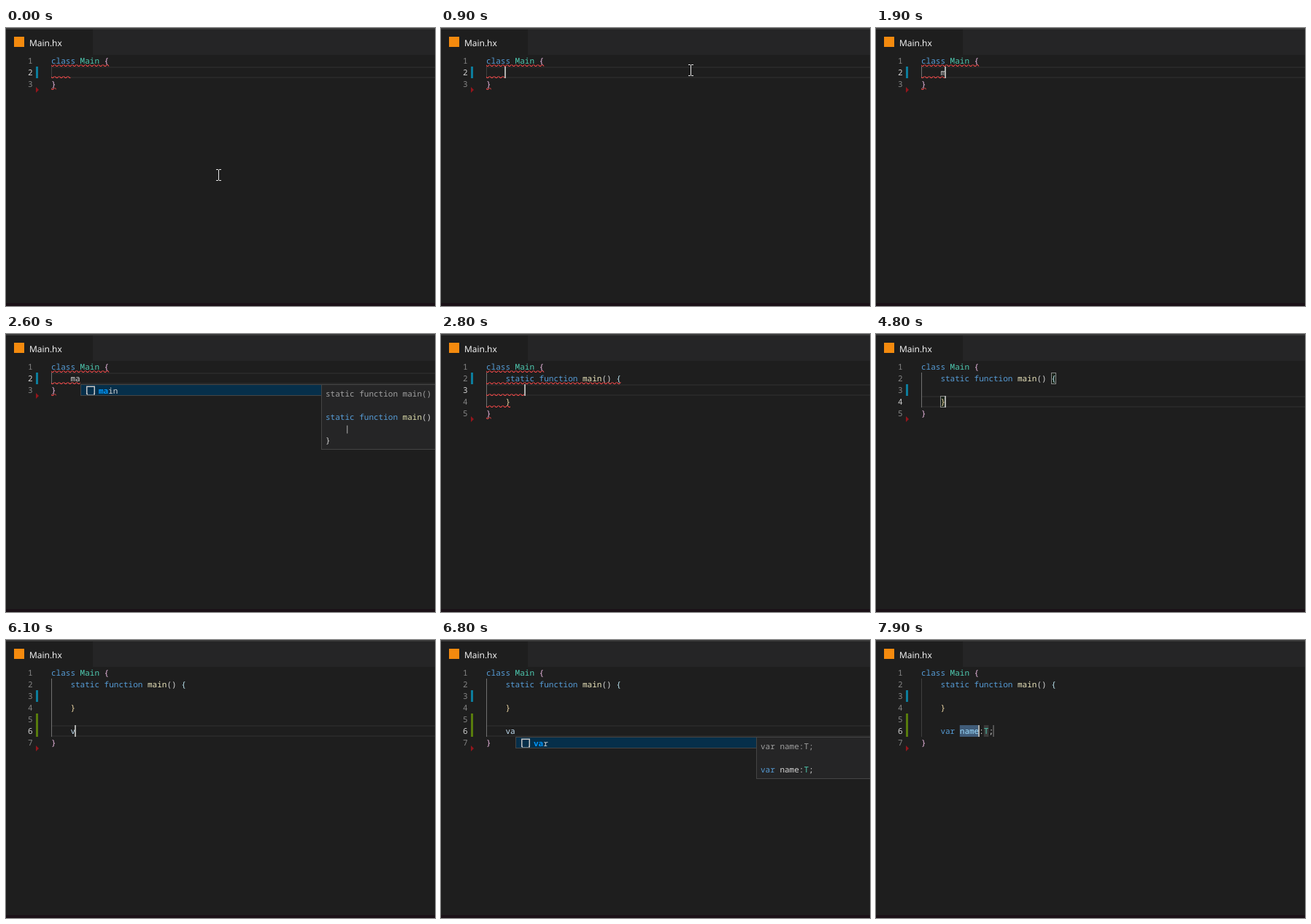
Write an HTML page that moves like this. It is 588 px wide and 382 px high and loops after 8 s.

```html
<!DOCTYPE html>
<html lang="en">
<head>
<meta charset="utf-8">
<title>Main.hx</title>
<style>
html, body { margin: 0; width: 100%; height: 100%; overflow: hidden; background: #1e1e1e; }
svg { display: block; width: 588px; height: 382px; }
text { font: 11px "Noto Sans Mono", monospace; text-rendering: geometricPrecision; white-space: pre; }
.tab { font: 12px "Open Sans", sans-serif; }
.num { text-anchor: end; }
.hit { font-weight: 700; }
</style>
</head>
<body>
<svg viewBox="0 0 588 382">
  <defs>
    <pattern id="wave" x="62" y="2" width="6" height="16" patternUnits="userSpaceOnUse">
      <path fill="#f44747" d="M5.5 0L2.5 3H1.1L4.1 0ZM4 0L6 2V.6L5.4 0ZM0 2L1 3H2.4L0 .6Z"/>
    </pattern>
  </defs>
  <rect width="588" height="382" fill="#1e1e1e"/>
  <rect width="588" height="37" fill="#252526"/>
  <rect width="119" height="37" fill="#1e1e1e"/>
  <rect width="588" height="2" fill="#3a3a3a"/>
  <rect y="378" width="588" height="4" fill="#1b1117"/>
  <rect x="11" y="12" width="14" height="14" fill="#f48a0e"/>
  <text class="tab" x="32" y="25" fill="#fff">Main.hx</text>
  <g id="view"></g>
</svg>
<script>
const LOOP = 8000, LEFT = 62, TOP = 37, ROW = 16, CHAR = 6.6;
const view = document.getElementById('view');

const colors = {
  class: '#569cd6', static: '#569cd6', function: '#569cd6', var: '#569cd6',
  Main: '#4ec9b0', T: '#4ec9b0', main: '#ece6bd', name: '#9cdcfe',
  v: '#c0dcf0', va: '#c0dcf0', '|': '#d4d4d4'
};

// I-beam pointer: time, x, y
const pointer = [
  [0, 291, 202], [100, 287, 194], [200, 286, 168], [300, 292, 128],
  [400, 305, 90], [500, 320, 67], [600, 330, 60], [900, 342, 58], [1000, 341, 61]
];

const rowY = row => TOP + (row - 1) * ROW;
const colX = col => LEFT + col * CHAR;
const rect = (x, y, w, h, fill, extra = '') =>
  `<rect x="${x}" y="${y}" width="${w}" height="${h}" fill="${fill}" ${extra}/>`;
const text = (x, y, str, fill, cls = '') =>
  `<text x="${x.toFixed(2)}" y="${y}" fill="${fill}" class="${cls}">${str}</text>`;

// Colours each word; pick(word) may override the palette
function code(str, x, y, pick = () => '') {
  let out = '';
  for (const m of str.matchAll(/\w+|[^\w\s]+/g))
    out += text(x + m.index * CHAR, y, m[0], pick(m[0]) || colors[m[0]] || '#d4d4d4');
  return out;
}

function bodyLines(t) {
  const fn = ['    static function main() {', ' '.repeat(8), '    }'];
  const pad = ' '.repeat(4);
  if (t < 1900) return [pad];
  if (t < 2100) return [pad + 'm'];
  if (t < 2800) return [pad + 'ma'];
  if (t < 5000) return fn;
  if (t < 5100) return [...fn, pad];
  const typed = t < 6100 ? '' : t < 6400 ? 'v' : t < 7000 ? 'va' : 'var name:T;';
  return [...fn, '', pad + typed];
}

// Caret: row, column and the time it last moved or gained focus
function caretAt(t) {
  const moves = [
    [0, 2, 4], [900, 2, 4], [1900, 2, 5], [2100, 2, 6], [2800, 3, 8], [4700, 4, 5],
    [5000, 5, 4], [5100, 6, 4], [6100, 6, 5], [6400, 6, 6], [7000, 6, 12]
  ];
  const [since, row, col] = moves.filter(m => m[0] <= t).pop();
  let age = t - since;
  if (since === 6400) age += 100;
  if (since === 7000) age += 100;
  return { row, col, on: since > 0 && age % 1000 < 500 };
}

function popup(x, y, word, hits, docs, h) {
  const px = Math.round(x), dx = px + 330;
  let out = rect(px + .5, y + .5, 330, 15, '#062f4a', 'stroke="#454545"');
  out += `<path d="M${px + 10} ${y + 13.5}H${px + 8.75}V${y + 3.25}H${px + 19.25}V${y + 13.5}H${px + 18}" fill="none" stroke="#c5c5c5" stroke-width="1.5"/>`;
  out += `<path d="M${px + 10} ${y + 14.5}H${px + 19}" stroke="#c5c5c5" stroke-dasharray="1 1"/>`;
  out += text(px + 25, y + 13, word.slice(0, hits), '#0097fb', 'hit');
  out += text(px + 25 + hits * CHAR, y + 13, word.slice(hits), '#d4d4d4');
  out += rect(dx + .5, y + .5, 300, h - 1, '#252526', 'stroke="#454545"');
  out += code(docs[0], dx + 6, y + 17, () => '#a0a0a0');
  docs.forEach((s, i) => {
    out += code(s, dx + 6, y + 49 + i * ROW, w => w === 'main' ? '#dcdcaa' : w === 'name' ? '#d4d4d4' : '');
  });
  return out;
}

function draw(t) {
  const lines = ['class Main {', ...bodyLines(t), '}'];
  const last = lines.length, caret = caretAt(t), picked = t >= 7000;
  const cy = rowY(caret.row);
  let out = '';

  if (!picked)
    out += rect(LEFT, cy, 526, 2, '#282828') + rect(LEFT, cy + 14, 526, 2, '#282828');
  else
    out += rect(colX(8), cy, 4 * CHAR, ROW, '#405c79') + rect(colX(13), cy, CHAR, ROW, '#3a3a3a')
      + rect(160, cy, 2, ROW, '#525252');

  out += rect(LEFT, rowY(2), 1, (last - 2) * ROW, t < 1900 || picked ? '#404040' : '#707070');

  if (t >= 4800 && t < 5000)
    for (const [row, col] of [[2, 27], [4, 4]])
      out += rect(Math.round(colX(col)) + .5, rowY(row) + .5, 6, 15, '#1b251b', 'stroke="#888"');

  lines.forEach((line, i) => {
    const row = i + 1, base = rowY(row) + 12;
    const outer = i === 0 || row === last;
    out += text(36.5, base, row, row === caret.row ? '#d0d0d0' : '#858585', 'num');
    out += code(line, LEFT, base, w =>
      w === '{' ? (outer ? '#eab8e0' : '#b9e2ee') : w === '}' ? (outer ? '#eab8e0' : '#efd9a5') : '');
    if (t < 3900) out += rect(LEFT, rowY(row) + 13, (line.length * CHAR).toFixed(1), 3, 'url(#wave)');
  });

  // change marks in the gutter
  out += rect(41, rowY(t < 3000 ? 2 : 3), 3, ROW, '#0c7d9d');
  if (t >= 5400) out += rect(41, rowY(5), 3, 2 * ROW, '#587c0c');
  const end = rowY(last + 1);
  out += `<path d="M41 ${end - 4}L45 ${end}L41 ${end + 4}Z" fill="#94151b"/>`;

  if (caret.on) out += rect(Math.round(colX(caret.col)) - 1, cy, 2, ROW, '#aeafad');

  const below = cy + ROW, hits = caret.col - 4;
  if (t >= 2000 && t < 2800)
    out += popup(colX(caret.col), below, 'main', hits, ['static function main() {', '    |', '}'], 90);
  if (t >= 6200 && t < 7000)
    out += popup(colX(caret.col), below, 'var', hits, ['var name:T;'], 58);

  if (t < 1900) {
    const [, x, y] = pointer.filter(p => p[0] <= t).pop();
    out += `<path transform="translate(${x} ${y})" d="M-3 -7.5H0M1 -7.5H4M.5 -7V7M-3 7.5H0M1 7.5H4" stroke="#e8e8e8" fill="none"/>`;
  }
  return out;
}

let start, shown = -1;
function tick(now) {
  start ??= now;
  const step = Math.floor(((now - start) % LOOP) / 100);
  if (step !== shown) view.innerHTML = draw((shown = step) * 100);
  requestAnimationFrame(tick);
}
view.innerHTML = draw(0);
requestAnimationFrame(tick);
</script>
</body>
</html>
```
